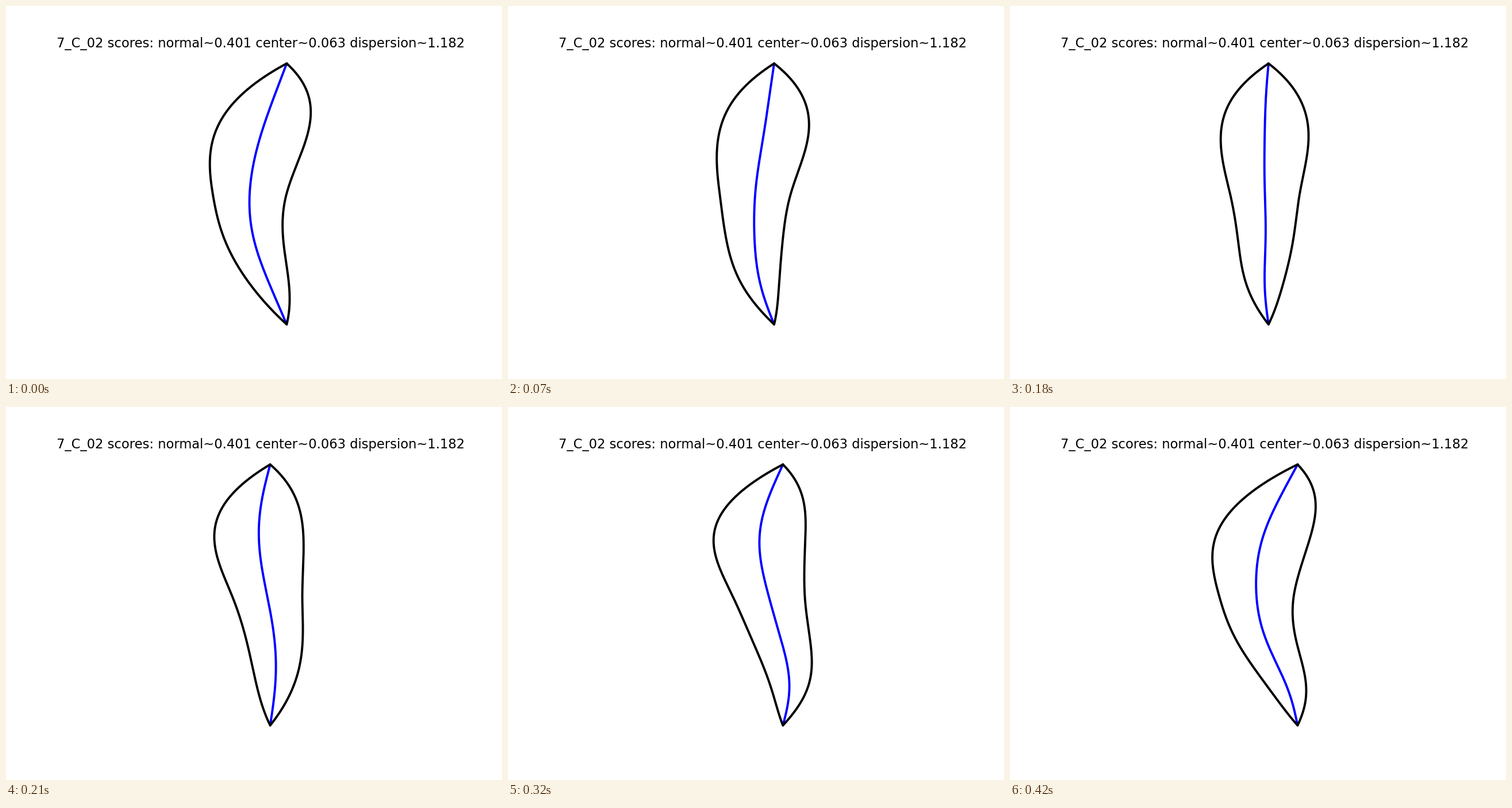
A matplotlib script for the animation above (490 ms loop, 863 by 649 pixels).

```python
import numpy as np
import matplotlib.pyplot as plt
from matplotlib.animation import FuncAnimation

W, H, DPI = 863, 649, 64
PT = 72 / DPI  # points per pixel
FRAMES = 7
TOP, BOTTOM = 100, 554
REST_X = 476.2
TITLE = "7_C_02 scores: normal~0.401 center~0.063 dispersion~1.182"

v = np.linspace(0, 1, 161)
ys = TOP + (BOTTOM - TOP) * v


def wave(phase, mean, amp, shift, second=0):
    """Periodic value with a little second harmonic."""
    return (mean + amp * np.cos(phase + shift)
            + second * np.cos(2 * phase + 0.3))


def hermite(u, x0, s0, x1, s1):
    h = u * u * (3 - 2 * u)
    return x0 + (x1 - x0) * h + s0 * u * (1 - u) ** 2 - s1 * u * u * (1 - u)


def half_width():
    upper = hermite(2 * v, 0, 330, 63, -48)
    lower = hermite(2 * v - 1, 63, -48, 0, -150)
    return np.where(v < 0.5, upper, lower)


def pose(phase):
    """Tip position and the bending modes of the centre line."""
    tip = wave(phase, REST_X, 24.9, 1.17, 2.6)
    bends = [
        wave(phase, 36.5, 33.4, 0.73, 2.25),
        wave(phase, 7.8, 15, 2.44, 1.05),
        wave(phase, -0.85, 2.8, -1.7),
        wave(phase, 0.7, 1.8, 1.7),
        wave(phase, -0.4, 1.1, 4.84),
    ]
    centre = tip - sum(b * np.sin(n * np.pi * v)
                       for n, b in enumerate(bends, 1))
    return tip, centre


PROFILE = half_width()

fig = plt.figure(figsize=(W / DPI, H / DPI), dpi=DPI, facecolor="white")
ax = fig.add_axes([0, 0, 1, 1])
ax.set_xlim(0, W)
ax.set_ylim(H, 0)
ax.axis("off")
ax.text(443, 72, TITLE, fontsize=22.6 * PT, family="DejaVu Sans",
        ha="center", va="baseline", color="black")

style = dict(lw=3.9 * PT, solid_capstyle="round", solid_joinstyle="round")
axis_line, = ax.plot([], [], color="blue", **style)
outline, = ax.plot([], [], color="black", **style)


def draw(i):
    tip, centre = pose(2 * np.pi * i / FRAMES)
    half = PROFILE * (1 + 0.0015 * (tip - REST_X))
    axis_line.set_data(centre, ys)
    outline.set_data(np.concatenate([centre - half, (centre + half)[::-1]]),
                     np.concatenate([ys, ys[::-1]]))
    return axis_line, outline


anim = FuncAnimation(fig, draw, frames=FRAMES, interval=70,
                     repeat=True, repeat_delay=0)
plt.show()
```
